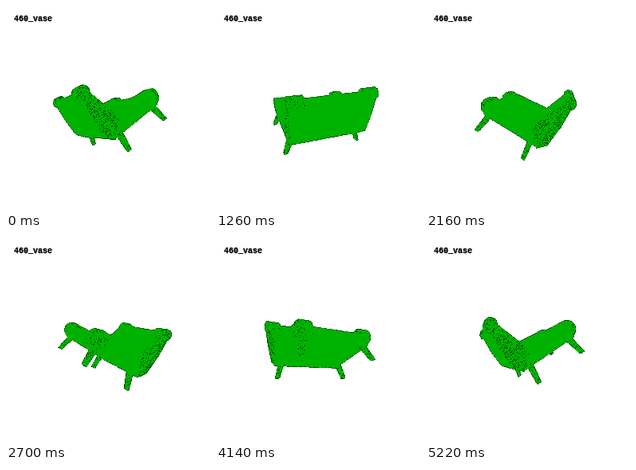
These frames come from a looping animation (256x256 px, 5400 ms). An HTML page with a canvas:

```html
<!DOCTYPE html>
<html lang="en">
<head>
<meta charset="utf-8">
<title>Turntable</title>
<style>
html, body { margin: 0; width: 100%; height: 100%; overflow: hidden; background: #fff; }
canvas { display: block; position: absolute; left: 0; top: 0; }
#label {
  position: absolute; left: 10px; top: 11px;
  font: bold 10px/12px "Liberation Mono", "DejaVu Sans Mono", monospace;
  -webkit-text-stroke: 0.3px #000;
  color: #000; white-space: pre;
}
</style>
</head>
<body>
<canvas id="stage" width="256" height="256"></canvas>
<div id="label">460_vase</div>
<script>
const SIZE = 256, STEPS = 30, STEP_MS = 180;
const GREEN = [0, 178, 0], DARK = [0, 66, 0];
const ctx = document.getElementById('stage').getContext('2d', { willReadFrequently: true });

// Sofa frame: origin between the feet, axes along length, depth and height.
const ORIGIN = [23, 34, -7];
const LONG = [-0.438, 0.114, -0.891];
const DEEP = [0.739, -0.508, -0.439];
const TALL = [-0.503, -0.851, 0.138];
const CAMERA = { x: 128, y: 127, dist: 280, tilt: 0.03 };

const rgb = c => `rgb(${c})`;

function place(p, q, r) {
  p *= 1 + 0.0014 * (r - 19);
  return ORIGIN.map((o, i) => o + p * LONG[i] + q * DEEP[i] + r * TALL[i]);
}

function circle(q, r, radius) {
  return Array.from({ length: 14 }, (_, i) => {
    const a = i / 14 * Math.PI * 2;
    return [q + radius * Math.cos(a), r + radius * Math.sin(a)];
  });
}

const faces = [];

function addFace(points, grain) {
  faces.push({ points, grain });
}

// Extrudes a depth/height profile along the length; grain is the share of dark dots.
function prism(profile, p0, p1, capGrain = 0, sideGrain = 0) {
  const a = profile.map(([q, r]) => place(p0, q, r));
  const b = profile.map(([q, r]) => place(p1, q, r));
  addFace(a, capGrain);
  addFace(b, capGrain);
  a.forEach((_, i) => {
    const j = (i + 1) % a.length;
    addFace([a[i], a[j], b[j], b[i]], sideGrain);
  });
}

function leg(sp, sq) {
  const ring = (p, q, r, h) => [[-h, -h], [h, -h], [h, h], [-h, h]]
    .map(([dp, dq]) => place(sp * p + dp, sq * q + dq, r));
  const top = ring(40, 26, 23, 3.2), foot = ring(49, 29.4, 0.5, 2.2);
  addFace(foot, 0.15);
  top.forEach((_, i) => {
    const j = (i + 1) % 4;
    addFace([top[i], top[j], foot[j], foot[i]], 0.12);
  });
}

prism([[-36, 19], [31, 19], [34, 24], [31, 35], [-28, 35]], -46, 46);
prism([[-36, 18], [-22, 32], [-24, 46], [-37, 79], [-45, 78], [-46, 52], [-44, 27]],
  -46.5, 46.5, 0.2);
for (const side of [-1, 1]) {
  prism([[-35, 19], [30, 20], [34, 24], [30, 40], [-25, 45]], side * 36, side * 46);
  prism(circle(29.5, 30.5, 10), side * 34, side * 46.5, 0.15, 0.03);
  prism(circle(-40.5, 77, 7), side * 31, side * 46.5, 0.18, 0.06);
  leg(side, -1);
  leg(side, 1);
}

function seeded(seed) {
  return () => {
    seed = (seed + 0x6D2B79F5) | 0;
    let t = Math.imul(seed ^ (seed >>> 15), 1 | seed);
    t = (t + Math.imul(t ^ (t >>> 7), 61 | t)) ^ t;
    return ((t ^ (t >>> 14)) >>> 0) / 4294967296;
  };
}

function turn([x, y, z], c, s) {
  return [x * c + z * s, y, z * c - x * s];
}

function project([x, y, z]) {
  const k = 1 / (1 - z / CAMERA.dist);
  return [CAMERA.x + k * x, CAMERA.y + k * (y + CAMERA.tilt * z)];
}

function area(flat) {
  return Math.abs(flat.reduce((sum, [x, y], i) => {
    const [nx, ny] = flat[(i + 1) % flat.length];
    return sum + x * ny - y * nx;
  }, 0)) / 2;
}

function mean(points) {
  return points[0].map((_, i) => points.reduce((t, p) => t + p[i], 0) / points.length);
}

function speckle(flat, count, random) {
  const mid = mean(flat);
  ctx.fillStyle = rgb(DARK);
  for (let n = 0; n < count; n++) {
    const i = Math.floor(random() * flat.length);
    const a = flat[i], b = flat[(i + 1) % flat.length];
    const reach = Math.sqrt(random()), along = random();
    const [x, y] = [0, 1].map(d =>
      mid[d] + reach * (a[d] + along * (b[d] - a[d]) - mid[d]));
    ctx.fillRect(Math.floor(x), Math.floor(y), 1, 1);
  }
}

function drawFace({ flat, grain }, random) {
  ctx.fillStyle = rgb(GREEN);
  ctx.beginPath();
  flat.forEach(([x, y]) => ctx.lineTo(x, y));
  ctx.closePath();
  ctx.fill();
  speckle(flat, Math.round(area(flat) * grain), random);
}

// Hard pixels with a broken dark rim.
function harden(random) {
  const image = ctx.getImageData(0, 0, SIZE, SIZE), px = image.data;
  const solid = new Uint8Array(SIZE * SIZE);
  for (let i = 0; i < solid.length; i++) solid[i] = px[i * 4 + 3] > 127 ? 1 : 0;
  for (let i = 0; i < solid.length; i++) {
    let color = [255, 255, 255];
    if (solid[i]) {
      const rim = !(solid[i - 1] && solid[i + 1] && solid[i - SIZE] && solid[i + SIZE]);
      color = px[i * 4 + 1] < 120 || (rim && random() < 0.68) ? DARK : GREEN;
    }
    px.set([...color, 255], i * 4);
  }
  ctx.putImageData(image, 0, 0);
}

function draw(step) {
  const angle = step / STEPS * Math.PI * 2;
  const c = Math.cos(angle), s = Math.sin(angle);
  const random = seeded(step * 977 + 5);
  ctx.clearRect(0, 0, SIZE, SIZE);
  faces
    .map(({ points, grain }) => {
      const space = points.map(p => turn(p, c, s));
      return { grain, flat: space.map(project), depth: mean(space)[2] };
    })
    .sort((a, b) => a.depth - b.depth)
    .forEach(face => drawFace(face, random));
  harden(random);
}

let shown = -1;
function tick() {
  const step = Math.floor(performance.now() / STEP_MS) % STEPS;
  if (step !== shown) draw(shown = step);
  requestAnimationFrame(tick);
}
tick();
</script>
</body>
</html>
```
